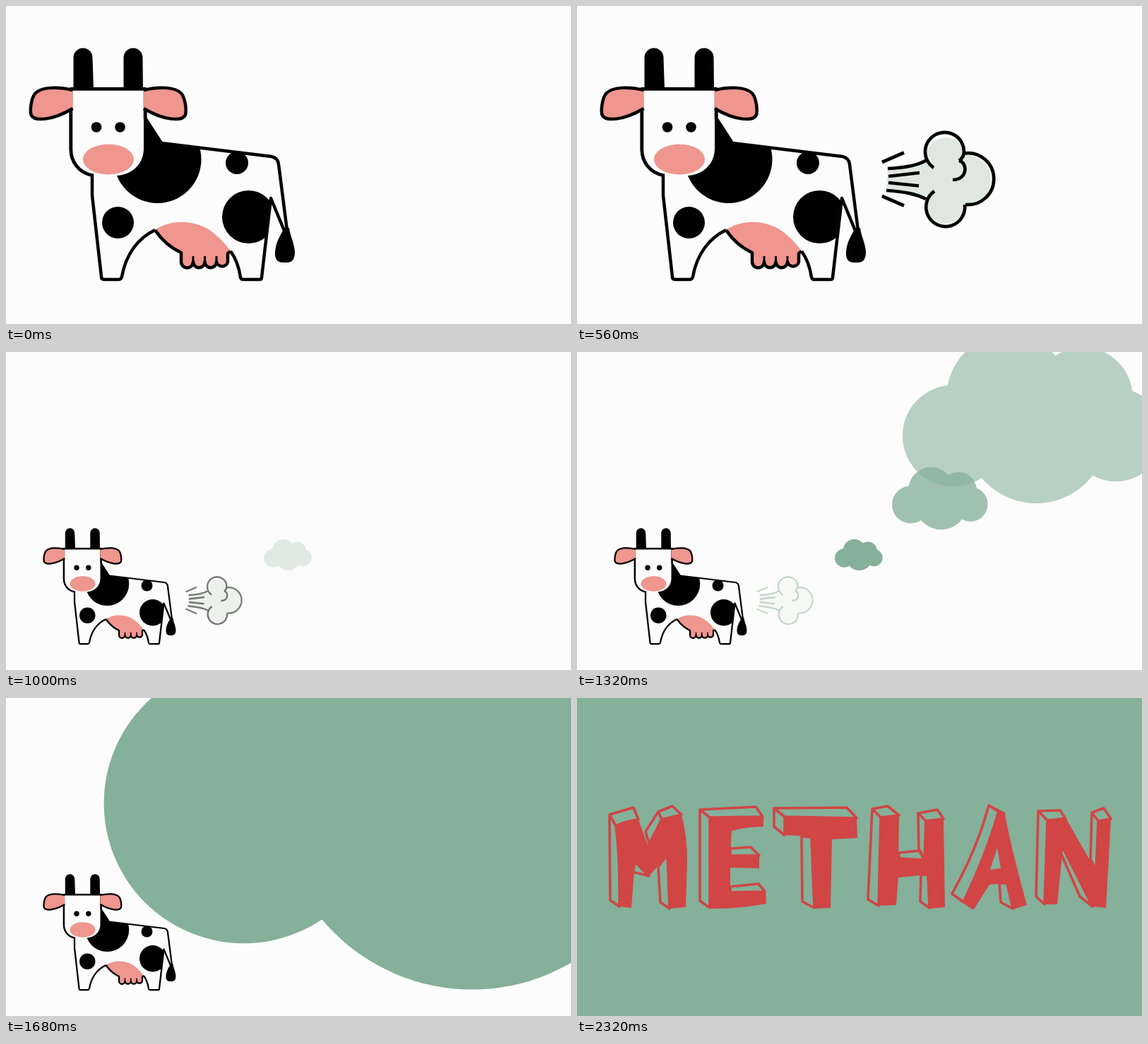
Write an HTML page with a canvas that moves like this. It is 800 by 450 pixels and loops after 2640 ms.

```html
<!DOCTYPE html>
<html lang="de">
<head>
<meta charset="utf-8">
<title>Methan</title>
<style>
html, body { margin: 0; width: 100%; height: 100%; overflow: hidden; background: #fcfcfc; }
canvas { display: block; width: 800px; height: 450px; }
</style>
</head>
<body>
<canvas id="stage" width="800" height="450" role="img" aria-label="METHAN"></canvas>
<script>
const ctx = document.getElementById('stage').getContext('2d');
const PAPER = '#fcfcfc', GREEN = '#85b09a', PINK = '#ef968e', RED = '#d14545', MIST = '#e0e7e0';
const LOOP = 2640, STEP = 40;

const clamp = v => Math.max(0, Math.min(1, v));
const span = (t, a, b) => clamp((t - a) / (b - a));
const ease = u => (1 - Math.cos(Math.PI * u)) / 2;
const mix = (a, b, u) => a + (b - a) * u;
const P = d => new Path2D(d);

function fill(path, color) { ctx.fillStyle = color; ctx.fill(path); }
function line(path, width, color = '#000') {
  ctx.lineWidth = width;
  ctx.strokeStyle = color;
  ctx.stroke(path);
}
function oval(x, y, rx, ry, color) {
  ctx.beginPath();
  ctx.ellipse(x, y, rx, ry, 0, 0, 7);
  ctx.fillStyle = color;
  ctx.fill();
}
const dot = (x, y, r) => oval(x, y, r, r, '#000');

// Cow
const body = P('M122 238V268L135 383Q135 387 139 387H160Q163 387 164 383C170 350 188 328 211 317L318 347C326 358 330 370 332 384Q333 387 336 387H359Q362 387 362 384L375 272L395 318L386 224Q385 215 376 213L220 194L198 160L150 180Z');
const bodyLine = P('M122 238V268L135 383Q135 387 139 387H160Q163 387 164 383C170 350 188 328 211 317M318 347C326 358 330 370 332 384Q333 387 336 387H359Q362 387 362 384L375 272L394 318M398 318L386 224Q385 215 376 213L220 194L198 160');
const udder = P('M211 317C232 301 273 301 297 324Q310 335 318 347L314 350V362A8.2 8.2 0 0 1 298 362A8.2 8.2 0 0 1 281.5 362A8.2 8.2 0 0 1 265 362A8.2 8.2 0 0 1 248 362V348Q226 339 211 317Z');
const udderLine = P('M211 317Q226 339 248 349V362A8.4 8.4 0 0 0 265 362A8.2 8.2 0 0 0 281.5 362A8.2 8.2 0 0 0 298 362A8.2 8.2 0 0 0 314 362V350L318 347');
const slits = P('M265 354V364M281.5 354V364M298 354V364');
const tuft = P('M394 314C389 324 382 333 381 348Q380 363 392 363H398Q409 363 409 348C408 334 402 325 401 314Z');
const head = P('M92 118H195V203C194 225 178 238 158 240H124C101 236 92 218 92 203Z');
const headLine = P('M124 240C101 236 92 218 92 203V117.5H197V203');
const ear = P('M94.5 119C74 114 50 114 41 124C35 132 34 148 35.5 154C40 164 66 162 94.5 145');
const horns = P('M95.5 118V73A13.5 13.5 0 0 1 122.5 73L124 118ZM166.5 118V73A13.5 13.5 0 0 1 193.5 73L194 118Z');

function drawEar() {
  fill(ear, PINK);
  line(ear, 4.5);
}

function cow(u) {
  ctx.save();
  const s = mix(1, 0.5, u);
  ctx.translate(36 * u, 219.5 * u);
  ctx.scale(s, s);
  fill(body, PAPER);
  ctx.save();
  ctx.clip(body);
  dot(214.5, 217, 62);
  dot(327, 222, 16);
  dot(343.5, 298.5, 37.5);
  dot(158.5, 306.5, 22.5);
  ctx.restore();
  line(bodyLine, 4.5);
  fill(udder, PINK);
  line(udderLine, 4.5);
  line(slits, 3);
  fill(tuft, '#000');
  line(headLine, 5);
  fill(head, PAPER);
  line(P('M124 240C101 236 92 218 92 203V117.5H197V160'), 4.5);
  drawEar();
  ctx.save();
  ctx.translate(289.5, 0);
  ctx.scale(-1, 1);
  drawEar();
  ctx.restore();
  fill(horns, '#000');
  dot(128, 171.5, 7.3);
  dot(161.5, 171.5, 7.3);
  oval(145, 217, 36, 21.5, PINK);
  ctx.restore();
}

// Puff of gas
const puffFill = P('M440 230C465 229 482 226 495 218A27 27 0 1 1 549 209A36 36 0 1 1 549 283A28 28 0 1 1 494 273C480 266 465 263 438 261Z');
const puffLine = P('M440 230C465 229 482 226 495 218M505 229A27.5 27.5 0 1 1 548 206Q548 214 541 219M549 208.5A36.5 36.5 0 1 1 550 281M506 262A27.5 27.5 0 1 0 549 281M541 219C553 221 554 246 532 246M438 261C465 263 480 266 494 273M432 221L463 207.5M441 241L485 236M441 250L484 254.5M432 269L463 282.5');

function puffAlpha(t) {
  if (t < 880) return span(t, 360, 520);
  if (t < 1000) return mix(1, 0.52, span(t, 880, 1000));
  if (t < 1320) return mix(0.52, 0.22, span(t, 1000, 1320));
  return mix(0.22, 0, span(t, 1320, 1560));
}

function puff(t, u) {
  const a = puffAlpha(t);
  if (!a) return;
  const s = mix(1, 0.5, u), k = span(t, 1000, 1320);
  ctx.save();
  ctx.globalAlpha = a;
  ctx.translate(38.5 * u, 229 * u);
  ctx.scale(s, s);
  fill(puffFill, MIST);
  line(puffLine, 4.7, `rgb(${10 * k},${90 * k},${40 * k})`);
  ctx.restore();
}

// Lobes as [x, y, radius], measured in radii of the left lobe
const lobes = [[0, 0, 1], [1.09, -0.78, 1.22], [2.55, -0.76, 0.98], [3.2, -0.02, 0.92], [1.631, -0.07, 1.4]];

function cloud(x, y, r, alpha) {
  if (!alpha) return;
  ctx.globalAlpha = alpha;
  ctx.fillStyle = GREEN;
  ctx.beginPath();
  for (const [lx, ly, lr] of lobes) {
    const cx = x + lx * r, cy = y + ly * r;
    ctx.moveTo(cx + lr * r, cy);
    ctx.arc(cx, cy, lr * r, 0, 2 * Math.PI);
  }
  ctx.fill();
  ctx.globalAlpha = 1;
}

function bigCloud(t) {
  const r = mix(67.5, 297, ease(span(t, 1250, 2040)));
  const d = r - 71.5, q = d * (r - 198);
  cloud(533.5 - 1.553 * d - 0.00042 * q, 118.5 + 0.241 * d + 0.00052 * q, r, span(t, 1138, 1458));
}

// Block letters: solid front and outlined sides
const letters = [
  { front: 'M56 181L87 172L100 208L120 172L148 165Q156 195 156 230L154 296L131 298L128 222L102 252L82 232L77 297L60 295Q61 225 56 181Z',
    sides: 'M46 165L55 181Q61 225 60 295L47 286ZM46 165L80 155L87 172Q70 174 55 181ZM115 161L135 153L148 165L120 172ZM115 161L120 172L102 206L97 189ZM115 239L128 222L131 298L118 289ZM82 232L79 246L102 252Z' },
  { front: 'M188 169L264 167V182Q240 182 219 188L217 223H258V241L217 240V275L267 273L268 291Q225 299 188 298Z',
    sides: 'M174 158L188 169V297L174 287ZM174 158L253 154L263 168L188 169ZM217 213L246 211L258 223H217ZM217 267L257 263L266 274L217 275Z' },
  { front: 'M294 168L396 170L397 198L361 200L359 297L336 298L332 196L294 194Z',
    sides: 'M279 156L382 155L396 170L294 168ZM279 156L294 168V194L279 182ZM318 196L332 197L336 297L319 288Z' },
  { front: 'M430 169L456 166L455 227L492 229L494 174L519 171L521 296L499 298L497 250L455 254L452 293L427 294Z',
    sides: 'M418 157L440 153L456 166L430 169ZM418 157L430 169L427 294L412 285ZM456 219L486 216L491 229L456 227ZM483 163L510 158L519 171L494 174ZM483 163L494 174L492 228L484 216ZM487 250L497 250L499 297L486 288Z' },
  { front: 'M595 160L606 164Q614 210 637 293L617 299L609 262L584 264L562 299L547 289Q580 220 595 160ZM595 212L585 243L600 241Z',
    sides: 'M583 152L597 161Q578 225 547 289L531 277Q566 215 583 152ZM583 152L606 164M531 277L561 298M598 262L609 262L617 298L600 289Z' },
  { front: 'M666 173L691 168L735 245L738 174L756 171L749 297L730 295L688 212L680 292L662 292Z',
    sides: 'M653 160L666 173L662 292L650 281ZM653 160L684 159L692 171L666 173ZM729 162L746 156L756 171L738 174ZM729 162L738 174L735 244L727 228ZM684 217L688 212L730 295L712 281Z' }
].map(l => ({ front: P(l.front), sides: P(l.sides) }));

function title(alpha) {
  if (!alpha) return;
  ctx.globalAlpha = alpha;
  ctx.fillStyle = GREEN;
  ctx.fillRect(0, 0, 800, 450);
  for (const { front, sides } of letters) {
    ctx.fillStyle = RED;
    ctx.fill(front, 'evenodd');
    line(sides, 3.6, RED);
  }
  ctx.globalAlpha = 1;
}

function draw(t) {
  ctx.lineJoin = 'round';
  ctx.fillStyle = PAPER;
  ctx.fillRect(0, 0, 800, 450);
  const shrink = ease(span(t, 620, 940));
  puff(t, shrink);
  cow(shrink);
  bigCloud(t);
  cloud(472.5, 216, 26.5, span(t, 1074, 1394));
  cloud(378.3, 291.5, 13.2, span(t, 925, 1245));
  title(span(t, 2040, 2320));
}

const start = performance.now();
function tick() {
  const t = (performance.now() - start) % LOOP;
  draw(Math.floor(t / STEP) * STEP);
  requestAnimationFrame(tick);
}
tick();
</script>
</body>
</html>
```
